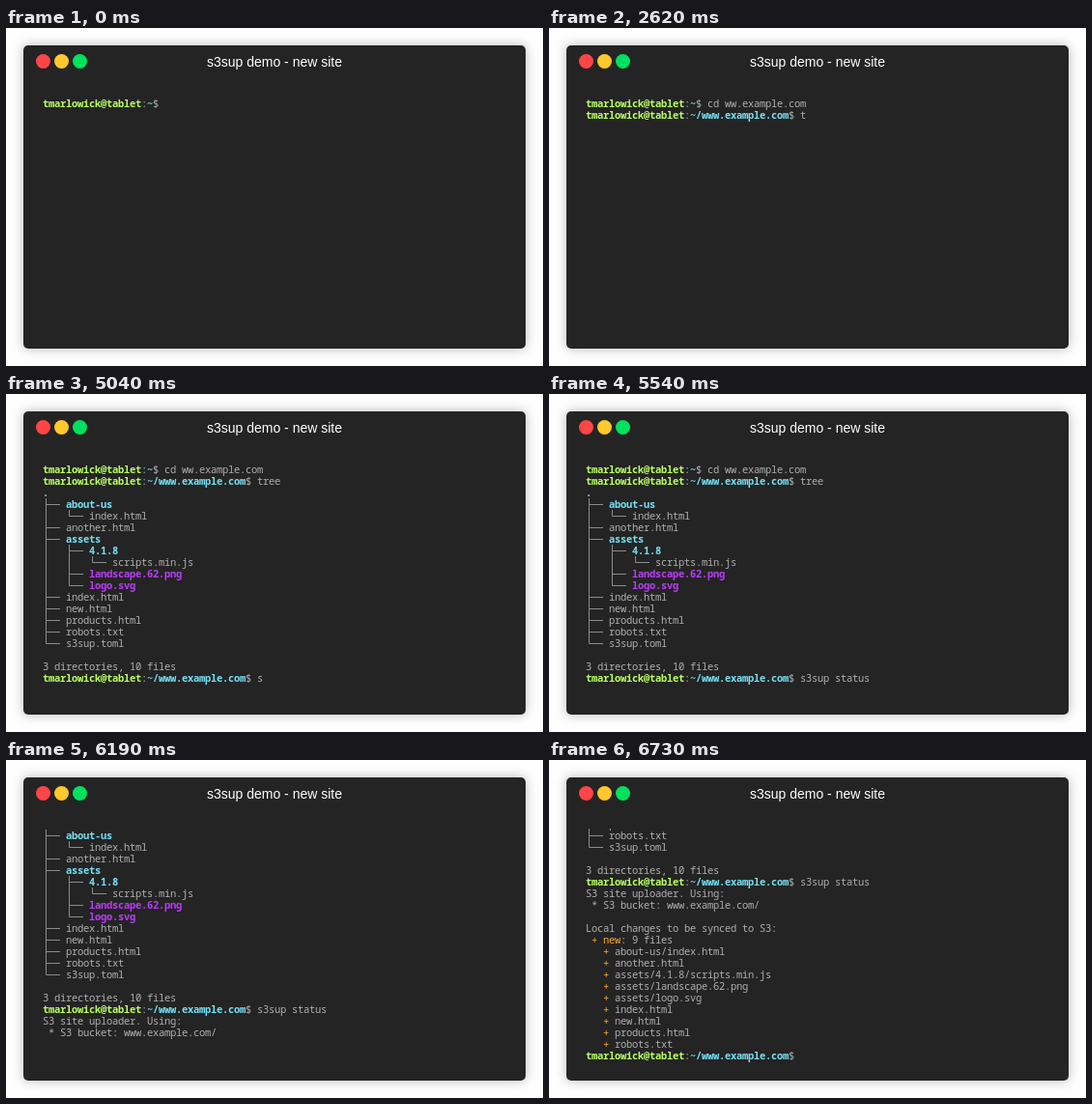
These frames come from a looping animation (556x350 px, 8000 ms). An HTML page:

```html
<!DOCTYPE html>
<html lang="en">
<head>
<meta charset="utf-8">
<title>s3sup demo</title>
<style>
  html, body { margin: 0; width: 100%; height: 100%; overflow: hidden; background: #fefefe; }
  svg { display: block; width: 100%; height: 100%; }
  .window { fill: #242424; filter: drop-shadow(0 0 6px rgba(0, 0, 0, .28)); }
  .title { font: 14px "Liberation Sans", Arial, sans-serif; fill: #fff; text-anchor: middle; }
  #rows text {
    font: 10.5px "Noto Sans Mono", "DejaVu Sans Mono", monospace;
    letter-spacing: -.3px; white-space: pre; fill: #afafaf;
  }
  #rows .user, #rows .dir, #rows .img { font-weight: 700; }
  #rows .user { fill: #b9ff62; }
  #rows .dir { fill: #75dff2; }
  #rows .img { fill: #b93cf6; }
  #rows .add { fill: #ffa727; }
  #rows path { fill: none; stroke: #8c8c8c; }
</style>
</head>
<body>
<svg viewBox="0 0 556 350">
  <clipPath id="screen"><rect x="30" y="71" width="496" height="243"/></clipPath>
  <rect class="window" x="18" y="18" width="520" height="314" rx="5"/>
  <circle cx="38.5" cy="34.5" r="7.5" fill="#ff4547"/>
  <circle cx="57.5" cy="34.5" r="7.5" fill="#ffc82c"/>
  <circle cx="76.5" cy="34.5" r="7.5" fill="#00e25d"/>
  <text class="title" x="278" y="40">s3sup demo - new site</text>
  <g clip-path="url(#screen)"><g id="rows"></g></g>
</svg>
<script>
const LOOP = 8000, LEFT = 38, TOP = 72, COL = 6, LINE = 12;
const box = document.getElementById('rows');
const rows = [], typed = [];

// Scroll position in lines, from the given time on
const scroll = [[0, 0], [6090, 1], [6190, 3], [6460, 4], [6560, 14]];

function add(parent, tag, attrs, text = '') {
  const el = document.createElementNS('http://www.w3.org/2000/svg', tag);
  for (const k in attrs) el.setAttribute(k, attrs[k]);
  el.textContent = text;
  parent.append(el);
  return el;
}

// parts: [text, class] pairs laid out on the character grid
function row(time, parts = [], col = 0) {
  const g = add(box, 'g', {});
  const y = TOP + LINE * rows.length;
  let last;
  for (const [text, cls = ''] of parts) {
    last = add(g, 'text', { x: LEFT + col * COL, y: y + 10, class: cls }, text);
    col += text.length;
  }
  rows.push({ g, time });
  return { g, y, last };
}

function prompt(time, path, keys) {
  const { last } = row(time, [['tmarlowick@tablet', 'user'], [':'], [path, 'dir'], ['$ '], ['']]);
  typed.push({ el: last, keys: [[0, ''], ...keys] });
}

// stems: '|' open branch, '+' tee, 'L' corner, one per depth
function branch(stems, name, cls) {
  const { g, y } = row(3040, [[name, cls]], stems.length * 4);
  const mid = y + 6.5;
  let d = '';
  [...stems].forEach((s, i) => {
    const x = LEFT + i * 4 * COL + 3.5;
    d += `M${x} ${y}V${s === 'L' ? mid : y + LINE}`;
    if (s !== '|') d += `M${x} ${mid}h14.5`;
  });
  add(g, 'path', { d });
}

prompt(0, '~', [[1000, 'c'], [1300, 'cd'], [1420, 'cd ww.example.com']]);
prompt(1820, '~/www.example.com', [[2620, 't'], [2850, 'tr'], [2940, 'tree']]);
row(3040, [['.', 'dir']]);
branch('+', 'about-us', 'dir');
branch('|L', 'index.html');
branch('+', 'another.html');
branch('+', 'assets', 'dir');
branch('|+', '4.1.8', 'dir');
branch('||L', 'scripts.min.js');
branch('|+', 'landscape.62.png', 'img');
branch('|L', 'logo.svg', 'img');
['index.html', 'new.html', 'products.html', 'robots.txt'].forEach(f => branch('+', f));
branch('L', 's3sup.toml');
row(3040);
row(3040, [['3 directories, 10 files']]);
prompt(3040, '~/www.example.com',
  [[5040, 's'], [5220, 's3'], [5440, 's3sup st'], [5540, 's3sup status']]);
row(6090, [['S3 site uploader. Using:']]);
row(6190, [[' * S3 bucket: www.example.com/']]);
row(6190);
row(6460, [['Local changes to be synced to S3:']]);
row(6560, [['+ new', 'add'], [': 9 files']], 1);
['about-us/index.html', 'another.html', 'assets/4.1.8/scripts.min.js', 'assets/landscape.62.png',
  'assets/logo.svg', 'index.html', 'new.html', 'products.html', 'robots.txt']
  .forEach(f => row(6560, [['+ ', 'add'], [f]], 3));
prompt(6730, '~/www.example.com', []);

const at = (cues, t) => cues.filter(c => c[0] <= t).pop()[1];

function draw(now) {
  const t = Math.max(0, now) % LOOP;
  for (const r of rows) r.g.setAttribute('visibility', t >= r.time ? 'visible' : 'hidden');
  for (const { el, keys } of typed) {
    const text = at(keys, t);
    if (el.textContent !== text) el.textContent = text;
  }
  box.setAttribute('transform', `translate(0 ${-LINE * at(scroll, t)})`);
}

const start = performance.now();
function tick() {
  draw(performance.now() - start);
  requestAnimationFrame(tick);
}
tick();
</script>
</body>
</html>
```
